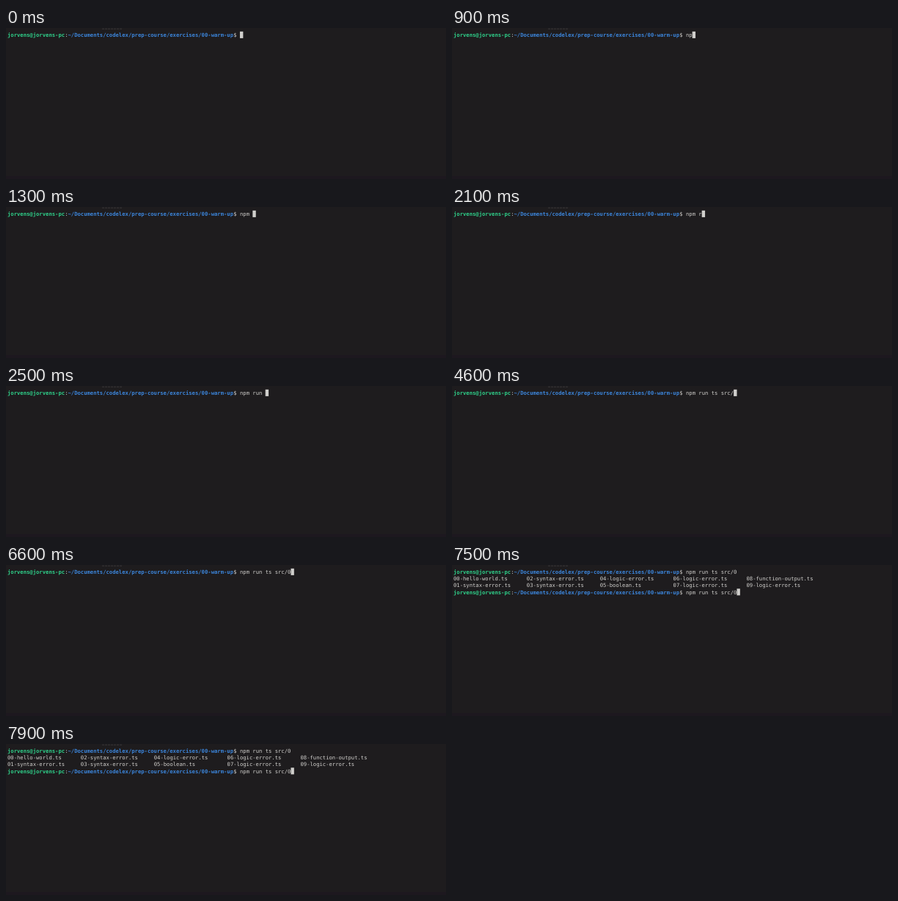
These frames come from a looping animation (600x206 px, 8 s). An HTML page:

```html
<!DOCTYPE html>
<html lang="en">
<head>
<meta charset="utf-8">
<title>Terminal</title>
<style>
  html, body { margin: 0; width: 100%; height: 100%; overflow: hidden; background: #1e1c1e; }
  svg { display: block; width: 600px; height: 206px; }
  text {
    font: 7.21px "DejaVu Sans Mono", "Liberation Mono", monospace;
    fill: #d0cfcc;
    white-space: pre;
    text-rendering: geometricPrecision;
  }
  .user, .path { font-weight: bold; }
  .user { fill: #2fd08a; }
  .path { fill: #3c86dc; }
</style>
</head>
<body>
<svg viewBox="0 0 600 206">
  <rect width="600" height="206" fill="#1e1c1e"/>
  <rect y="202" width="600" height="4" fill="#1d181f"/>
  <path d="M131 1.2H158" stroke="#403e40" stroke-width=".8" stroke-dasharray="3 1"/>
  <g id="screen"></g>
  <rect id="cursor" width="4.4" height="9.1" fill="#d0cfcc"/>
</svg>
<script>
const LOOP = 8000, LIST_AT = 7500;
const LEFT = 2, TOP = 4.8, CELL = 4.342, LINE = 9.17, BASE = 7.2;
const USER = "jorvens@jorvens-pc";
const PATH = "~/Documents/codelex/prep-course/exercises/00-warm-up";
const PROMPT = USER.length + PATH.length + 3;
const COMMAND = "npm run ts src/0";
const KEYS = [700, 900, 1200, 1300, 2100, 2300, 2400, 2500,
              3000, 3200, 3400, 3800, 4200, 4600, 4600, 6600];
const FILES = [
  ["00-hello-world.ts", "01-syntax-error.ts"],
  ["02-syntax-error.ts", "03-syntax-error.ts"],
  ["04-logic-error.ts", "05-boolean.ts"],
  ["06-logic-error.ts", "07-logic-error.ts"],
  ["08-function-output.ts", "09-logic-error.ts"]
];

const screen = document.getElementById("screen");
const cursor = document.getElementById("cursor");
const colX = col => LEFT + col * CELL;
const rowY = row => TOP + row * LINE;

function write(parent, col, row, str, cls = "") {
  const el = document.createElementNS("http://www.w3.org/2000/svg", "text");
  el.setAttribute("x", colX(col));
  el.setAttribute("y", rowY(row) + BASE);
  el.setAttribute("class", cls);
  el.textContent = str;
  parent.append(el);
  return el;
}

function prompt(parent, row) {
  write(parent, 0, row, USER, "user");
  write(parent, USER.length, row, ":");
  write(parent, USER.length + 1, row, PATH, "path");
  write(parent, PROMPT - 2, row, "$");
  return write(parent, PROMPT, row, "");
}

const input = prompt(screen, 0);
const listing = screen.appendChild(document.createElementNS("http://www.w3.org/2000/svg", "g"));
FILES.forEach((names, i) => names.forEach((name, j) => write(listing, i * 23, j + 1, name)));
prompt(listing, 3).textContent = COMMAND;

function draw(now) {
  const t = now % LOOP;
  const typed = KEYS.filter(k => k <= t).length;
  const listed = t >= LIST_AT;
  input.textContent = COMMAND.slice(0, typed);
  listing.setAttribute("visibility", listed ? "visible" : "hidden");
  cursor.setAttribute("x", colX(PROMPT + typed));
  cursor.setAttribute("y", rowY(listed ? 3 : 0));
}

let start;
function tick(now) {
  start ??= now;
  draw(now - start);
  requestAnimationFrame(tick);
}
draw(0);
requestAnimationFrame(tick);
</script>
</body>
</html>
```
